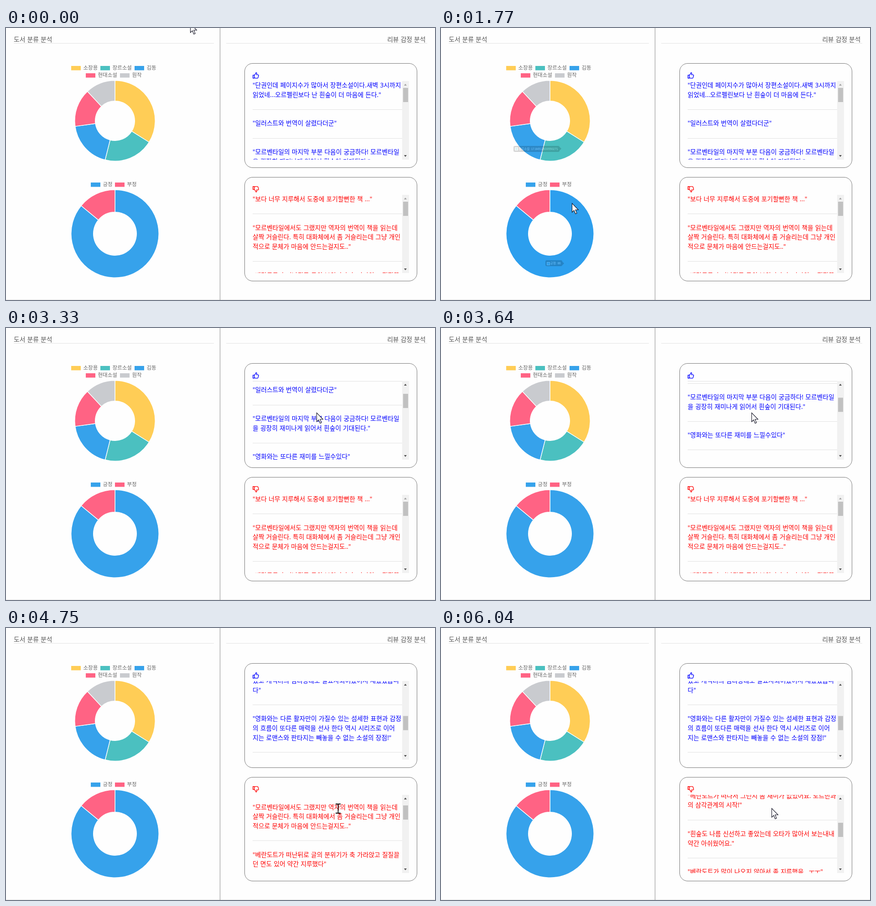
Write an HTML page that moves like this. It is 941 by 595 pixels and loops after 6.35 s.

```html
<!DOCTYPE html>
<html lang="ko">
<head>
<meta charset="utf-8">
<title>도서 리뷰 분석</title>
<style>
html, body { margin: 0; width: 100%; height: 100%; overflow: hidden; background: #fefefe; }
body {
  position: relative;
  font: 13.8px/20.65px "Open Sans", "Noto Sans CJK KR", "Noto Sans CJK", sans-serif;
  word-spacing: .5px;
  white-space: pre;
}
body > *, .list, .bar, .bar > *, .tip i { position: absolute; }
#art, #pointer { left: 0; top: 0; width: 941px; height: 595px; }
h1 { margin: 0; top: 14.7px; font: inherit; color: #555; }
.card {
  box-sizing: border-box; left: 523px; width: 379px; height: 229px;
  border: 1px solid #777; border-radius: 18px;
}
.view { left: 541px; width: 343px; height: 172px; overflow: hidden; }
.list { top: -.8px; left: 0; width: 328px; }
.item { padding-bottom: 21.6px; margin-bottom: 19.3px; border-bottom: 1px solid #e1e1e1; }
.bar { right: 0; top: 0; width: 15px; height: 100%; background: #f1f1f1; }
.thumb { left: 2px; top: 15px; width: 11px; height: 31px; background: #c1c1c1; }
.up, .down { left: 4px; border: 3.5px solid transparent; }
.up { top: 3px; border-bottom: 4px solid #505050; }
.down { bottom: 3px; border-top: 4px solid #505050; }
#edge { left: 541px; top: 116px; width: 328px; height: 1px; background: #e1e1e1; }
.tip {
  height: 13px; padding: 0 3px; border-radius: 3px; background: rgba(0,0,0,.8); color: #fff;
  font: bold 6.4px/13px "Liberation Sans", "Noto Sans CJK KR", sans-serif; word-spacing: 0;
}
.tip b { display: inline-block; box-sizing: border-box; width: 7px; height: 7px; border: 1px solid #fff; vertical-align: -1.5px; margin-right: 1px; }
.tip i { top: 2.5px; border: 4px solid transparent; }
.tip.before i { left: 100%; border-right: 0; border-left-color: rgba(0,0,0,.8); }
.tip.after i { right: 100%; border-left: 0; border-right-color: rgba(0,0,0,.8); }
.legend { font-size: 11.5px; font-weight: 300; fill: #666; }
</style>
</head>
<body>
<svg id="art" viewBox="0 0 941 595">
  <path d="M17 33.5H456M483 33.5H924M0 594.5H941" stroke="#e3e3e3"/>
  <path d="M469.5 0V595" stroke="#8a8a8a"/>
  <g id="slices" stroke="#fff" stroke-width="1.4" stroke-linejoin="round"></g>
  <g id="legend" class="legend"></g>
  <defs>
    <g id="hand" fill="none" stroke-width="1.4" stroke-linejoin="round">
      <path d="M.7 6.2H3.7V12.8H.7ZM3.7 6.4 6.5 3 7.2.8Q9.5.8 9.2 3.2L8.6 5.4H12Q13.5 5.7 12.9 7.5L11.7 11.9Q11.4 12.9 10.4 12.9H7L3.7 11.9"/>
    </g>
  </defs>
  <use href="#hand" x="541" y="97" stroke="#00f"/>
  <use href="#hand" transform="translate(541 359.5) scale(1 -1)" stroke="#f00"/>
</svg>
<h1 style="left:17px">도서 분류 분석</h1>
<h1 style="right:20.5px">리뷰 감정 분석</h1>
<div class="card" style="top:77px"></div>
<div class="card" style="top:326px;height:228px"></div>
<div class="view" id="good" style="top:116px;color:#00f"></div>
<div class="view" id="bad" style="top:365px;height:171px;color:#f00"></div>
<div id="edge"></div>
<svg id="pointer" viewBox="0 0 941 595">
  <path id="arrow" d="M.5.5V20L4.8 16 8 23.5 11 22.2 7.9 14.8H14.3Z" fill="#fff" stroke="#112" stroke-width="1.1"/>
  <path id="beam" d="M723 385H727.5L728.5 386 729.5 385H734M723 405H727.5L728.5 404 729.5 405H734M728.5 386V404" fill="none" stroke="#111" stroke-width="1.8"/>
</svg>
<script>
const LOOP = 6350;
const $ = id => document.getElementById(id);
const YELLOW = '#ffcd56', TEAL = '#4bc0c0', BLUE = '#36a2eb', PINK = '#ff6384', GREY = '#c9cbcf';

const charts = [
  { x: 239, y: 203, outer: 88.2, inner: 43.3, angles: [0, 122, 194.2, 262.1, 316.8, 360], colors: [YELLOW, TEAL, BLUE, PINK, GREY] },
  { x: 239, y: 450, outer: 96.2, inner: 47.3, angles: [0, 309.6, 360], colors: [BLUE, PINK] }
];

function polar(c, r, deg) {
  const a = deg * Math.PI / 180;
  return [c.x + r * Math.sin(a), c.y - r * Math.cos(a)];
}

function svg(parent, tag, attrs, text = '') {
  const el = document.createElementNS('http://www.w3.org/2000/svg', tag);
  for (const k in attrs) el.setAttribute(k, attrs[k]);
  el.textContent = text;
  return parent.appendChild(el);
}

function slice(c, i, fill) {
  const from = c.angles[i], to = c.angles[i + 1], big = to - from > 180 ? 1 : 0;
  const d = `M${polar(c, c.outer, from)}A${c.outer} ${c.outer} 0 ${big} 1 ${polar(c, c.outer, to)}`
    + `L${polar(c, c.inner, to)}A${c.inner} ${c.inner} 0 ${big} 0 ${polar(c, c.inner, from)}Z`;
  return svg($('slices'), 'path', { d, fill });
}
charts.forEach(c => c.colors.forEach((color, i) => slice(c, i, color)));

[
  [143, 87, YELLOW, '소장용'], [207, 87, TEAL, '장르소설'], [282, 87, BLUE, '김동'],
  [175, 103, PINK, '현대소설'], [250, 103, GREY, '원작'],
  [186, 342, BLUE, '긍정'], [239, 342, PINK, '부정']
].forEach(([x, y, fill, label]) => {
  svg($('legend'), 'rect', { x, y: y - 4, width: 21, height: 9.5, fill });
  svg($('legend'), 'text', { x: x + 26.5, y: y + 4 }, label);
});

// Hovered slices: the highlight switches hard, the tooltip fades.
const hovers = [
  { chart: 0, index: 4, fill: '#bcbfc5', on: 430, off: 600, text: '원작: 10.53864201937284' },
  { chart: 0, index: 0, fill: '#ffc233', on: 880, off: 1200, text: '소장용: 29.74945902824402' },
  { chart: 0, index: 1, fill: '#38b6b6', on: 1220, off: 1600, text: '장르소설: 17.84512830550271' },
  { chart: 1, index: 0, fill: '#2d9fee', on: 1740, off: 2330, text: '긍정: 86' }
];
for (const h of hovers) {
  const c = charts[h.chart];
  const [x, y] = polar(c, (c.outer + c.inner) / 2, (c.angles[h.index] + c.angles[h.index + 1]) / 2);
  h.glow = slice(c, h.index, h.fill);
  h.tip = document.createElement('div');
  h.tip.className = x > c.x ? 'tip before' : 'tip after';
  h.tip.innerHTML = `<b style="background:${c.colors[h.index]}"></b>${h.text}<i></i>`;
  h.tip.style.top = y - 6.5 + 'px';
  if (x > c.x) h.tip.style.right = `calc(100% - ${x - 4}px)`;
  else h.tip.style.left = x + 4 + 'px';
  document.body.insertBefore(h.tip, $('pointer'));
}

const reviews = {
  good: [
    '단권인데 페이지수가 많아서 장편소설이다.새벽 3시까지\n읽었네...오르펠린보다 난 흰숲이 더 마음에 든다.',
    '일러스트와 번역이 살렸다더군',
    '모르벤타일의 마지막 부분 다음이 궁금하다! 모르벤타일\n을 굉장히 재미나게 읽어서 흰숲이 기대된다.',
    '영화와는 또다른 재미를 느낄수있다',
    '판타지적요소가 너무 허황되지않고 흥미롭게 전개되더라\n구요 책을 읽은순간부터 그대로 쭉~달렸습니다 흡입력도\n있고 캐릭터의 심리상태도 잘묘사되어있어서 재밌었습니\n다',
    '영화와는 다른 활자만이 가질수 있는 섬세한 표현과 감정\n의 흐름이 또다른 매력을 선사 한다 역시 시리즈로 이어\n지는 로맨스와 판타지는 빼놓을 수 없는 소설의 장점!'
  ],
  bad: [
    '보다 너무 지루해서 도중에 포기할뻔한 책 ...',
    '모르벤타일에서도 그랬지만 역자의 번역이 책을 읽는데\n살짝 거슬린다. 특히 대화체에서 좀 거슬리는데 그냥 개인\n적으로 문체가 마음에 안드는걸지도..',
    '베란도트가 떠난뒤로 글의 분위기가 축 가라앉고 질질끌\n던 면도 있어 약간 지루했다',
    '베란도트가 떠나서 그런지 좀 재미가 없었어요. 도르반과\n의 삼각관계의 시작!',
    '흰숲도 나름 신선하고 좋았는데 오타가 많아서 보는내내\n약간 아쉬웠어요.',
    '베란도트가 많이 나오지 않아서 좀 지루했음.. ㅜㅜ'
  ]
};
for (const id in reviews) {
  const items = reviews[id].map(r => `<div class="item">"${r}"</div>`).join('');
  $(id).innerHTML = `<div class="list">${items}</div>`
    + '<div class="bar"><div class="up"></div><div class="thumb"></div><div class="down"></div></div>';
}

// Keyframes: time in ms, then values.
const scrolls = {
  good: [[3249, 0], [3250, 62], [3330, 72.5], [3400, 86], [3550, 86], [3780, 172], [3920, 172],
    [4025, 259.5], [4100, 259.5], [4350, 343.5]],
  bad: [[4640, 0], [4850, 86], [5170, 86], [5190, 98], [5265, 98], [5345, 172], [5790, 172], [6035, 257.3]]
};
const path = [
  [60, 404, -10], [350, 270, 80], [480, 225, 130], [680, 228, 180], [740, 228, 180],
  [980, 293, 167], [1140, 293, 167], [1370, 262, 255], [1430, 262, 255],
  [1760, 287, 383], [1840, 287, 383], [2020, 298, 440], [2090, 298, 440],
  [2700, 674, 192], [2770, 675, 192], [3000, 681, 185], [3940, 681, 185],
  [4025, 683, 191], [4100, 683, 191], [4570, 725, 390], [5560, 725, 390], [5570, 725, 394]
];

function at(keys, t) {
  const i = keys.findIndex(k => k[0] > t);
  if (i === 0) return keys[0].slice(1);
  if (i < 0) return keys[keys.length - 1].slice(1);
  const a = keys[i - 1], b = keys[i], p = (t - a[0]) / (b[0] - a[0]);
  return a.slice(1).map((v, j) => v + (b[j + 1] - v) * p);
}
const clamp = v => Math.max(0, Math.min(1, v));

function draw(t) {
  for (const h of hovers) {
    h.glow.style.opacity = t >= h.on && t < h.off ? 1 : 0;
    h.tip.style.opacity = Math.min(clamp((t - h.on) / 150), clamp(1 - (t - h.off) / 212));
  }
  for (const id in scrolls) {
    const [y] = at(scrolls[id], t), view = $(id);
    view.querySelector('.list').style.transform = `translateY(${-y}px)`;
    view.querySelector('.thumb').style.transform = `translateY(${y * .179}px)`;
    view.querySelector('.up').style.borderBottomColor = y ? '#505050' : '#a3a3a3';
  }
  $('edge').style.opacity = t >= 3250 && t < 4200 ? 1 : 0;
  const beam = t >= 4580 && t < 5570;
  $('beam').style.opacity = beam ? 1 : 0;
  $('arrow').style.opacity = beam ? 0 : 1;
  $('arrow').setAttribute('transform', `translate(${at(path, t)})`);
}

const start = performance.now();
function tick() {
  draw((performance.now() - start) % LOOP);
  requestAnimationFrame(tick);
}
tick();
</script>
</body>
</html>
```
